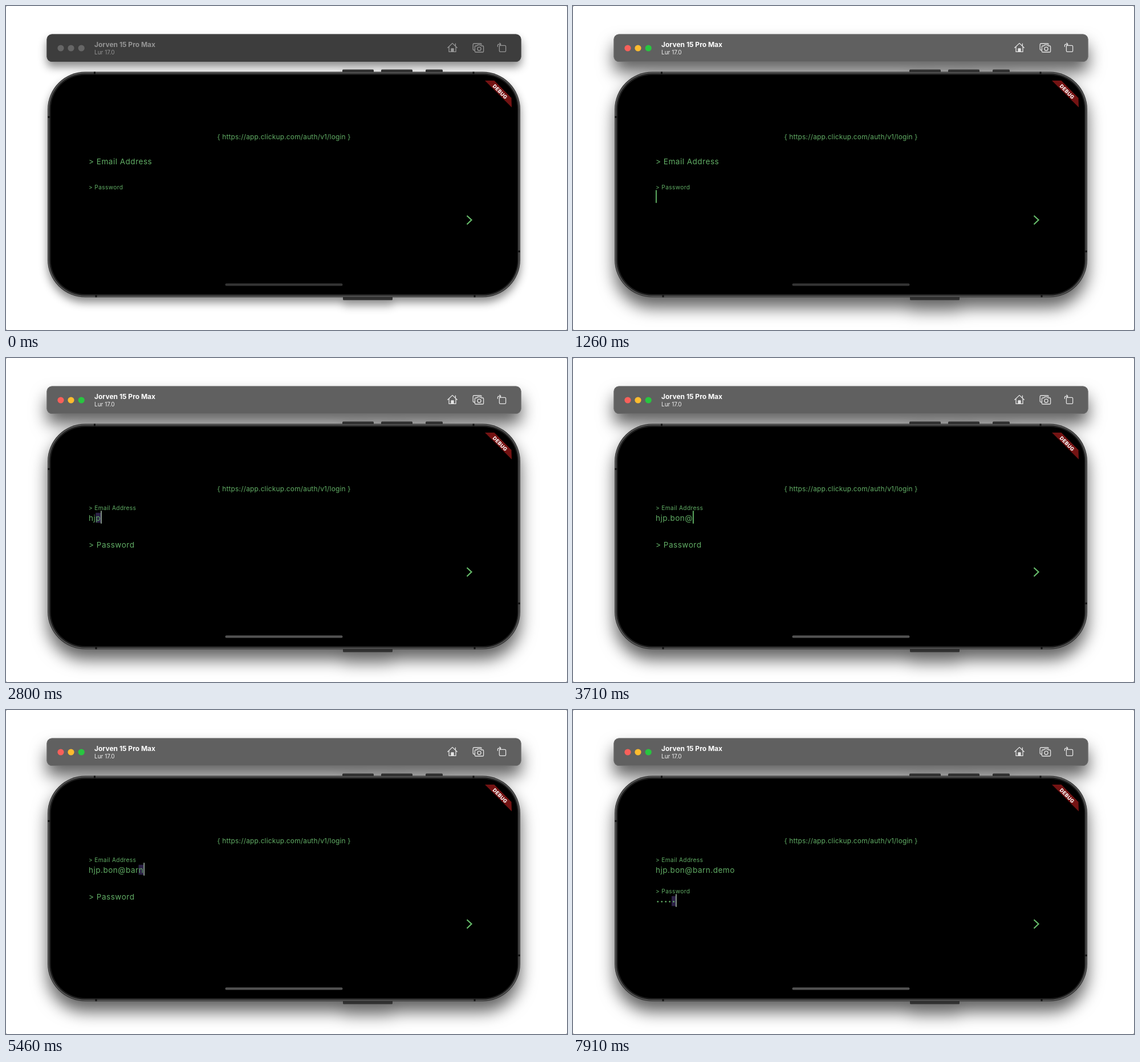
An HTML page for the animation above (8 s loop, 984x569 px).

```html
<!DOCTYPE html>
<html lang="en">
<head>
<meta charset="utf-8">
<title>Login</title>
<style>
  html, body { margin: 0; width: 100%; height: 100%; overflow: hidden; background: #fff; }
  svg { display: block; width: 984px; height: 569px; font-family: Inter, Roboto, sans-serif; }
  .field { font-size: 13.6px; letter-spacing: .47px; }
  .green { fill: #61ad65; }
  .icon { fill: none; stroke: var(--icon); stroke-width: 1.3; stroke-linejoin: round; stroke-linecap: round; }
  #stage { --bar: #3d3d3d; --edge: #484848; --icon: #979797; --title: #949494; --sub: #949494;
    --close: #666; --min: #666; --max: #666; }
  #stage.active { --bar: #606060; --edge: #6c6c6c; --icon: #e4e4e4; --title: #fff; --sub: #f0f0f0;
    --close: #f8605a; --min: #fdbb2f; --max: #28c640; }
  #shadow { filter: url(#soft); }
  .active #shadow { filter: url(#deep); }
</style>
</head>
<body>
<svg id="stage" viewBox="0 0 984 569">
  <defs>
    <filter id="soft" filterUnits="userSpaceOnUse" x="0" y="0" width="984" height="569" color-interpolation-filters="sRGB">
      <feDropShadow dx="0" dy="9" stdDeviation="7.5" flood-color="#000" flood-opacity=".45"/>
    </filter>
    <filter id="deep" filterUnits="userSpaceOnUse" x="0" y="0" width="984" height="569" color-interpolation-filters="sRGB">
      <feDropShadow dx="0" dy="18" stdDeviation="14.5" flood-color="#000" flood-opacity=".62"/>
    </filter>
  </defs>
  <rect width="984" height="569" fill="#777"/>
  <rect width="984" height="569" rx="2" fill="#fff"/>

  <g id="shadow">
    <rect x="71.5" y="49.5" width="832" height="48.5" rx="9" fill="var(--bar)"/>
    <g fill="#303030">
      <rect x="590" y="111.5" width="55" height="8" rx="1.5"/>
      <rect x="658" y="111.5" width="55" height="8" rx="1.5"/>
      <rect x="736" y="111.5" width="30" height="8" rx="1.5"/>
      <rect x="591" y="507" width="87" height="9.5" rx="1.5"/>
    </g>
    <rect x="73" y="115.5" width="829" height="396" rx="66" fill="#3a3a3a"/>
  </g>

  <!-- Window bar -->
  <rect x="72" y="50" width="831" height="47.5" rx="8.5" fill="none" stroke="var(--edge)"/>
  <circle cx="96" cy="74" r="5.6" fill="var(--close)"/>
  <circle cx="114" cy="74" r="5.6" fill="var(--min)"/>
  <circle cx="132.2" cy="74" r="5.6" fill="var(--max)"/>
  <text x="155" y="72.3" font-size="12" font-weight="700" fill="var(--title)">Jorven 15 Pro Max</text>
  <text x="155" y="85" font-size="10" fill="var(--sub)">Lur 17.0</text>
  <g class="icon">
    <path d="M774.8 73.2 783 65.4l8.2 7.8M777 71.5v8.9h12v-8.9M788.4 66.2v3.6"/>
    <path d="M781 80v-5.2h4V80z" fill="var(--icon)"/>
    <path d="M821.5 77.5h-.9q-1.4 0-1.4-1.4v-8.3q0-1.8 1.8-1.8h11.3q1.8 0 1.8 1.6"/>
    <path d="M824 70h2l1.3-1.7h5l1.3 1.7h2.4q1.6 0 1.6 1.6v7.8q0 1.6-1.6 1.6h-12q-1.6 0-1.6-1.6v-7.8q0-1.6 1.6-1.6z"/>
    <circle cx="830" cy="75.3" r="3.1"/>
    <rect x="865.4" y="69.4" width="11.2" height="11" rx="1.6"/>
    <path d="M862.4 71.3v-1.6q0-2.6 2.6-2.6h2.6M865.8 64.9l2.2 2.2-2.2 2.2"/>
  </g>

  <!-- Phone -->
  <rect x="74.5" y="117" width="826" height="393" rx="64.5" fill="#626262"/>
  <rect x="75.8" y="118.3" width="823.4" height="390.4" rx="63" fill="#202020"/>
  <path d="M155.500 115.500v5M820 115.500v5M158 507v4.500M822 507v4.500M73 195h5M897 431h5" stroke="#151515" stroke-width="3"/>
  <rect x="78.500" y="121" width="818.500" height="385" rx="60" fill="#000"/>
  <path d="M840 131h16.500l30 30.500.5 16.500z" fill="#741313"/>
  <text transform="translate(866.500 150.500) rotate(45)" y="3.100" text-anchor="middle" font-size="8.800"
    font-weight="800" letter-spacing=".3" fill="#fff">DEBUG</text>
  <rect id="home" x="384.500" y="487.300" width="206" height="4.200" rx="2.100"/>

  <!-- Form -->
  <text class="green" x="487.500" y="234.200" text-anchor="middle" font-size="11.900" letter-spacing=".2">{ https://app.clickup.com/auth/v1/login }</text>
  <path d="M808.500 368.300l8 7.500-8 7.700" fill="none" stroke="#66bb6a" stroke-width="2.200"/>
  <rect id="mark" fill="#2c2146"/>
  <g class="field green">
    <text id="emailLabel">&gt; Email Address</text>
    <text id="passLabel">&gt; Password</text>
    <text id="email" x="145" y="285.800"></text>
    <g id="dots"></g>
  </g>
  <rect id="caret" width="1.800" height="22.500"/>
</svg>
<script>
const $ = id => document.getElementById(id);
const LOOP = 8000, LEFT = 145, DOT = 7;
const TO_EMAIL = 1400, TO_PASS = 6510;

// "<" is a backspace
const keys = 'hjp.bon@barn.o<<.demo';
const keyTimes = [2520, 2660, 2800, 3080, 3290, 3430, 3570, 3710, 3920, 4060, 4200,
  4340, 4690, 4830, 5250, 5460, 5670, 5880, 6020, 6160, 6300];
const dotTimes = [7070, 7210, 7560, 7700, 7910];
const blink = [[0, 0], [70, .4], [140, .8], [350, 1], [770, .4], [840, 0], [1120, .4],
  [1190, .75], [1260, 1], [1960, .5], [2030, 0], [2240, .5], [2310, 1]];

const count = (times, t) => times.filter(at => at <= t).length;
const set = (el, attrs) => { for (const k in attrs) el.setAttribute(k, attrs[k]); };
const floatAt = dt => dt < 0 ? 0 : dt < 70 ? .35 : dt < 140 ? .8 : 1;

for (let i = 0; i < dotTimes.length; i++) {
  const dot = document.createElementNS('http://www.w3.org/2000/svg', 'circle');
  set(dot, { cx: 148.8 + i * 6.95, cy: 336.6, r: 1.4 });
  $('dots').append(dot);
}

function typed(n) {
  let s = '';
  for (const c of keys.slice(0, n)) s = c === '<' ? s.slice(0, -1) : s + c;
  return s;
}

function placeLabel(el, top, f) {
  el.setAttribute('transform', `translate(${LEFT} ${top - 10.7 * f}) scale(${1 - .25 * f})`);
}

function textWidth(s) {
  $('email').textContent = s;
  return s ? $('email').getComputedTextLength() : 0;
}

function draw(t) {
  const onEmail = t >= TO_EMAIL && t < TO_PASS;
  const up = floatAt(t - TO_EMAIL);
  const dots = count(dotTimes, t);
  const text = typed(count(keyTimes, t));

  $('stage').classList.toggle('active', t >= 1260);
  set($('home'), { fill: t < TO_EMAIL ? '#343434' : '#525252' });
  placeLabel($('emailLabel'), 278, up);
  placeLabel($('passLabel'), 332.8, 1 - up + floatAt(t - TO_PASS));
  [...$('dots').children].forEach((d, i) => set(d, { opacity: i < dots ? 1 : 0 }));

  const before = onEmail ? textWidth(text.slice(0, -1)) : Math.max(0, dots - 1) * DOT;
  const width = textWidth(text);
  const end = onEmail ? width : dots * DOT;
  const marked = onEmail ? /\w$/.test(text) : dots > 0;
  const top = onEmail ? 268.3 : 323.3;

  set($('mark'), { x: LEFT + before, y: top + 3.5, width: end - before, height: 17.5, opacity: marked ? 1 : 0 });
  set($('caret'), {
    x: LEFT + end, y: top,
    fill: marked ? '#8fa094' : '#66bb6a',
    opacity: blink.filter(b => b[0] <= t).pop()[1]
  });
}

const start = performance.now();
function tick() {
  draw((performance.now() - start) % LOOP);
  requestAnimationFrame(tick);
}
tick();
</script>
</body>
</html>
```
